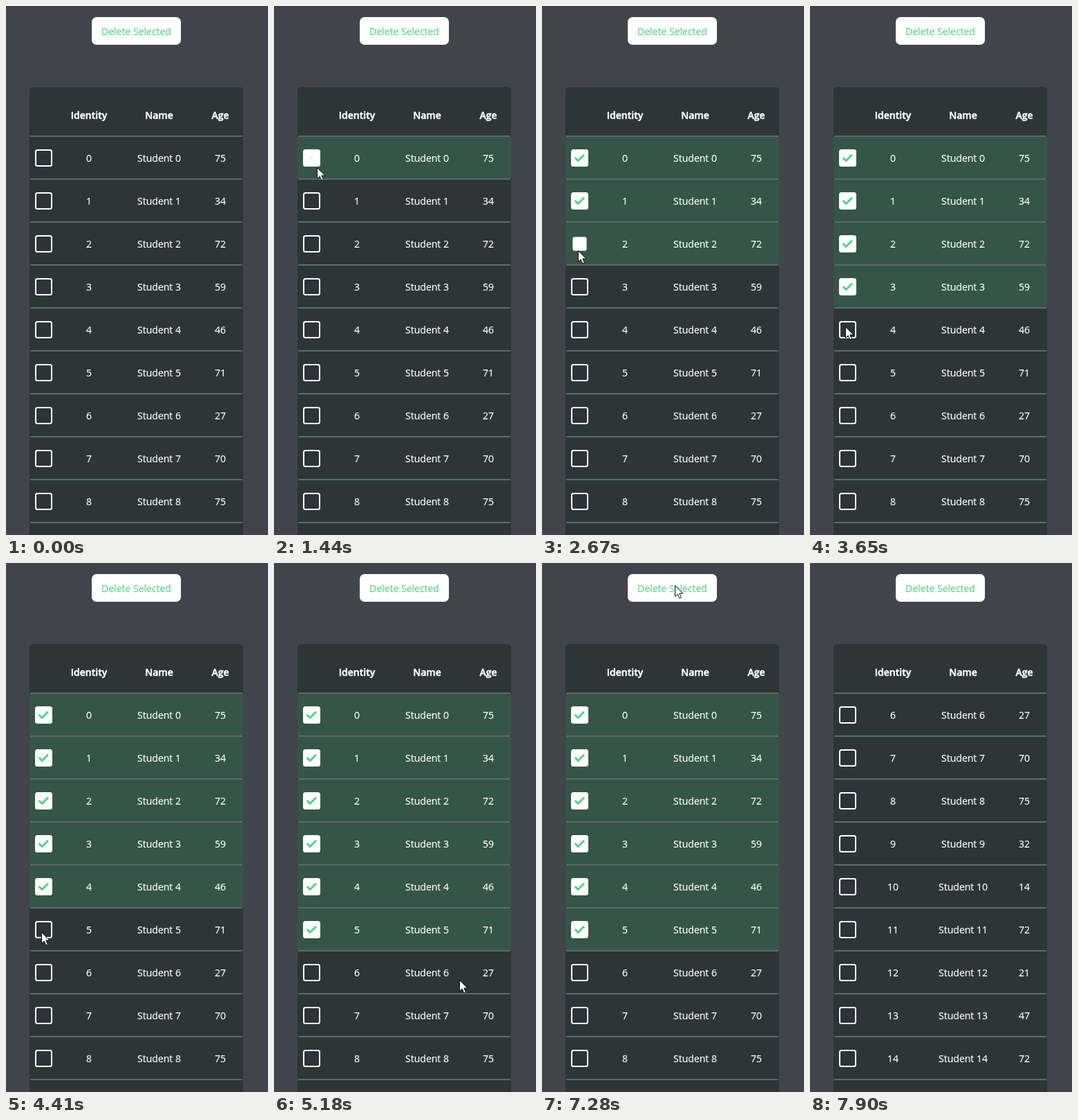
Animation of 379 by 764 pixels, one loop 8.7 s. Source, as an HTML page:

```html
<!DOCTYPE html>
<html lang="en">
<head>
<meta charset="utf-8">
<title>Student table</title>
<style>
  html, body { margin: 0; width: 100%; height: 100%; overflow: hidden; background: #42444b; }
  svg { display: block; width: 379px; height: 764px; }
  text { font: 14px "Open Sans", sans-serif; fill: #fff; stroke: #fff; stroke-width: .2px; text-anchor: middle; }
  .head { font-weight: 600; stroke-width: .5px; }
  .button { fill: #46d07e; stroke: none; }
</style>
</head>
<body>
<svg id="stage" viewBox="0 0 379 764"></svg>
<script>
const LOOP = 8700, START = 330, STEP = 69.28;
const DELETE_AT = 7345, LEAVE_AT = 7900;
const ROW_H = 62, VISIBLE = 9, SELECTED = 6;
const COLUMNS = { Identity: 120, Name: 221.5, Age: 310 };
const ages = [75, 34, 72, 59, 46, 71, 27, 70, 75, 32, 14, 72, 21, 47, 72];

const stage = document.getElementById("stage");
const clickTime = i => 1270 + 645 * i;
const clamp = v => Math.max(0, Math.min(1, v));
const smooth = v => v * v * (3 - 2 * v);
const ease = (t, from, length) => smooth(clamp((t - from) / length));

// Pointer stops: { from, to } is the rest period at (x, y).
const stop = (from, to, x, y) => ({ from, to, x, y });
const stops = [
  stop(START, START, 307, 701),
  ...Array.from({ length: SELECTED }, (_, i) =>
    stop(clickTime(i) - 100, clickTime(i) + 170, Math.max(51, 62 - 5 * i), 233 + 60 * i)),
  stop(5180, 5180, 268, 602),
  stop(5420, 5420, 286, 540),
  stop(6050, 7400, 192, 32),
  stop(LEAVE_AT, LOOP, 245, 701)
];

function add(parent, tag, attrs = {}, label) {
  const node = document.createElementNS("http://www.w3.org/2000/svg", tag);
  for (const key in attrs) node.setAttribute(key, attrs[key]);
  if (label !== undefined) node.textContent = label;
  parent.append(node);
  return node;
}

add(stage, "rect", { x: 124, y: 16, width: 129, height: 40, rx: 7, fill: "#fff" });
add(stage, "text", { x: 188.5, y: 42, class: "button" }, "Delete Selected");
add(stage, "rect", { x: 34, y: 117, width: 309, height: 700, rx: 5, fill: "#2d3537" });
for (const label in COLUMNS)
  add(stage, "text", { x: COLUMNS[label], y: 163, class: "head" }, label);

const rows = Array.from({ length: VISIBLE }, (_, i) => {
  const top = 189 + i * ROW_H;
  const back = add(stage, "rect", { x: 34, y: top, width: 309, height: 60, fill: "#345547" });
  const mark = add(stage, "g");
  const box = add(mark, "rect", { x: -11.5, y: -11.5, width: 23, height: 23, rx: 2.5, stroke: "#fff", "stroke-width": 2 });
  const tick = add(mark, "path", { d: "M-6.8 -.4L-2.3 4.1L6.5 -4.7", fill: "none", stroke: "#4fd282", "stroke-width": 2.8 });
  const cells = Object.values(COLUMNS).map(x => add(stage, "text", { x, y: top + 36 }));
  return { back, mark, box, tick, cells, y: top + 30.5 };
});

for (let i = 0; i <= VISIBLE; i++)
  add(stage, "rect", { x: 35, y: 187 + i * ROW_H, width: 307, height: 2, fill: "#5f696b" });

const pointer = add(stage, "path", {
  d: "M.5 .5V16.5L4.2 13L6.8 19L9.4 17.9L6.9 12H11.8Z",
  fill: "#fff", stroke: "#111"
});

function pointerAt(t) {
  const next = stops.findIndex(s => s.to >= t);
  const b = stops[next], a = stops[next - 1] || b;
  const p = ease(t, a.to, b.from - a.to || 1);
  return [a.x + (b.x - a.x) * p, a.y + (b.y - a.y) * p];
}

// The box dips and springs back, then the tick grows.
const boxScale = age => 1 - 0.2 * (ease(age, 0, 110) - ease(age, 120, 48));
const tickScale = age => clamp((age - 130) / 150);

function draw(t) {
  const first = t >= DELETE_AT ? SELECTED : 0;
  rows.forEach((row, i) => {
    const id = first + i;
    const age = id < SELECTED ? t - clickTime(id) : -1;
    const checked = age >= 0;
    row.back.setAttribute("visibility", checked ? "visible" : "hidden");
    row.box.setAttribute("fill", checked ? "#fff" : "#2e333a");
    row.mark.setAttribute("transform", `translate(54.5 ${row.y}) scale(${boxScale(age)})`);
    row.tick.setAttribute("transform", `scale(${tickScale(age)})`);
    [id, "Student " + id, ages[id]].forEach((label, c) => row.cells[c].textContent = label);
  });
  const [x, y] = pointerAt(t);
  pointer.setAttribute("transform", `translate(${Math.round(x)} ${Math.round(y)})`);
  pointer.setAttribute("visibility", t >= START && t < LEAVE_AT ? "visible" : "hidden");
}

// Motion is sampled in even ticks, like a screen recording.
function sample(t) {
  if (t < START || t >= LEAVE_AT) return t;
  return Math.min(LEAVE_AT - 1, START + Math.floor((t - START + 20) / STEP) * STEP);
}

const begin = performance.now();
function loop() {
  draw(sample((performance.now() - begin) % LOOP));
  requestAnimationFrame(loop);
}
loop();
</script>
</body>
</html>
```
